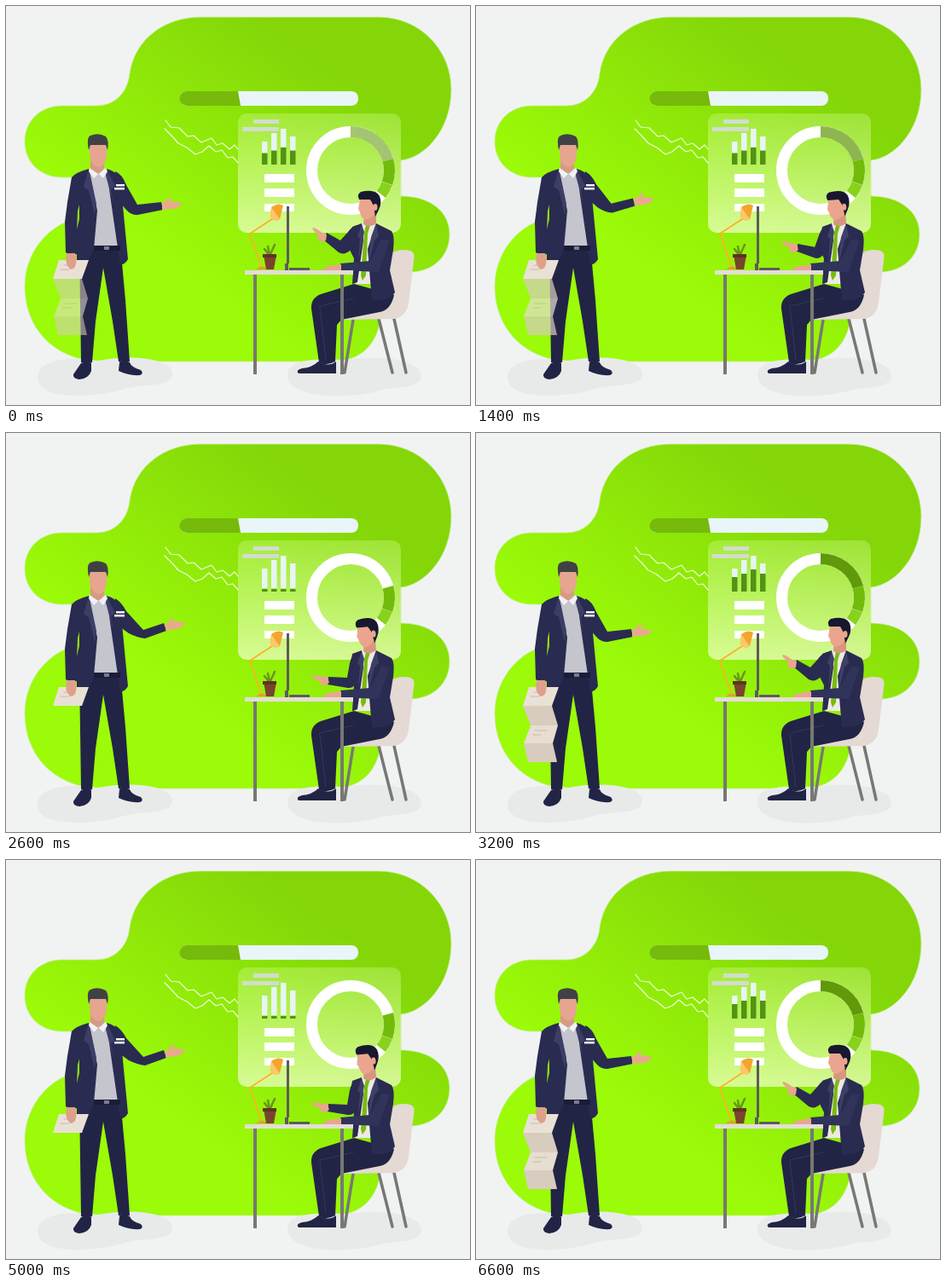
An HTML page for the animation above (6.8 s loop, 544 px wide and 468 px high).

```html
<!DOCTYPE html>
<html lang="en">
<head>
<meta charset="utf-8">
<title>Presentation</title>
<style>
html, body { margin: 0; width: 100%; height: 100%; overflow: hidden; background: #f1f3f3; }
svg { display: block; width: 544px; height: 468px; }
.navy { fill: #2a2b50; }
.dark { fill: #222445; }
.line { fill: none; stroke-linecap: round; stroke-linejoin: round; }
</style>
</head>
<body>
<svg viewBox="0 0 544 468">
  <defs>
    <linearGradient id="lime" gradientUnits="userSpaceOnUse" x1="375" y1="70" x2="205" y2="305">
      <stop stop-color="#84d609"/><stop offset="1" stop-color="#9bfb08"/>
    </linearGradient>
    <linearGradient id="glass" x1="0" y1="0" x2="0" y2="1">
      <stop stop-color="#d8ff9a" stop-opacity=".32"/><stop offset="1" stop-color="#f2ffcc" stop-opacity=".72"/>
    </linearGradient>
  </defs>

  <path fill="url(#lime)" stroke="#c9ee95" stroke-width=".8" d="M66 117H105C130 117 143 99 145 79C151 38 187 13 228 13H437C485 13 522 51 522 98
    C522 147 489 179 463 181V223C496 223 520 240 520 268C520 294 500 312 474 312
    C452 314 441 328 440 360C437 397 416 417 382 417H108C55 414 22 377 22 329C22 284 57 249 94 248
    C122 235 116 201 88 201H66C40 201 22 183 22 159C22 135 40 117 66 117Z"/>
  <g fill="#e8eaea">
    <path d="M37 436C37 414 74 411 108 416C150 408 195 414 195 431C195 448 160 443 139 449C100 461 37 462 37 436Z"/>
    <path d="M330 432C331 412 370 414 400 415C445 408 487 417 487 434C486 450 455 446 438 451C400 462 329 461 330 432Z"/>
  </g>

  <!-- progress bar and trend lines -->
  <rect x="204" y="100" width="209" height="17" rx="8" fill="#e9f5f9"/>
  <path fill="#76ba0b" d="M212 100H272L275 117H212A8.500 8.500 0 0 1 212 100Z"/>
  <g class="line" stroke="#effbdc" stroke-width="1.200">
    <path d="M187 134L193 142 203 143 213 153 220 152 229 160 241 155 247 163 254 161 262 168 268 163 272 168"/>
    <path d="M186 144L195 153 202 161 212 166 222 174 230 171 238 164 246 171 253 169 260 178 266 177 272 184"/>
  </g>

  <!-- dashboard -->
  <rect x="272" y="126" width="191" height="140" rx="10" fill="url(#glass)"/>
  <path fill="#d2dccd" d="M290 133h30v5h-30zM277 142h43v5h-43z"/>
  <path fill="#fff" d="M303 197h35v10h-35zM303 214h35v10h-35zM303 232h35v9h-35z"/>
  <g id="bars"></g>
  <g fill="none" stroke-width="13">
    <circle cx="404" cy="193" r="45.500" stroke="#fff"/>
    <path id="slice" stroke="#60990a"/>
    <path id="slice2" stroke="#72bb0b"/>
    <path id="slice3" stroke="#87d21b"/>
  </g>

  <!-- standing presenter -->
  <path class="dark" d="M86 280H134L140 345 145 417Q139 420 132 417L125 370 114 307 105 370 101 418Q94 421 88 418L87 350Z"/>
  <path class="dark" d="M88 419H100V428Q97 437 86 438Q78 437 79 432ZM133 418H145Q147 424 158 427Q162 431 157 433Q144 434 132 428Z"/>
  <path fill="#c4c5cd" d="M97 192L108 188 118 192 129 211 132 281H102Z"/>
  <path fill="#d79a82" d="M99 178H115V190Q107 202 99 191Z"/>
  <path fill="#e5a58e" d="M98 158H118V176Q117 188 108 189Q99 186 98 175Z"/>
  <path fill="#404145" d="M97 169Q94 154 99 152Q108 148 117 153Q121 158 119 169L117 163H99Z"/>
  <path class="navy" id="arm"/>
  <path id="palm" fill="#eaa98f" d="M0 -4Q5 -5 7 -9Q11 -12 12 -9L9 -5Q16 -6 22 -4Q24 -2 20 0Q15 4 8 3L0 4Z"/>
  <path class="navy" d="M97 191Q82 195 77 201L72 230 69 253 70 289Q77 294 83 291L83 306Q97 304 103 285L107 240Z"/>
  <path class="navy" d="M118 191Q129 194 134 202L138 245 143 297Q139 304 134 303L130 277 122 222Z"/>
  <path fill="#3c3e65" d="M97 191L91 212 97 216 104 245 106 232 99 199ZM118 191L128 211 123 216 126 232 117 199Z"/>
  <path fill="#f1f1f5" d="M98 190L108 197 103 202 97 194ZM117 190L109 197 114 202 119 194ZM129 209h10v2.500h-10zM127 213h12v2.500h-12z"/>
  <path fill="#8fdc10" d="M84 240L86 233 86 250 83 262Z"/>
  <path fill="#1b1c38" d="M103 281h31v6h-31z"/>
  <path fill="#7a7b92" d="M115 282h6v4h-6z"/>

  <!-- folding paper -->
  <g id="folds">
    <path fill="#d8ccbe" d="M55 320H89L96 343H64Z"/>
    <path fill="#e7ddd0" d="M64 343H96L90 364H56Z"/>
    <path fill="#d8ccbe" d="M56 364H90L95 386H61Z"/>
    <path class="line" stroke="#c5bbb0" d="M69 349h14M67 354h9"/>
  </g>
  <path fill="#eae1d6" d="M62 298H97L89 320H55Z"/>
  <path class="line" stroke="#c5bbb0" d="M68 304h8M64 309h10"/>
  <path fill="#dfa089" d="M71 290H81Q84 298 81 306Q76 312 73 306Q69 302 71 290Z"/>

  <!-- chair -->
  <path class="line" stroke="#777873" stroke-width="3.500" d="M407 368L397 430M437 367L453 430M455 367L469 430"/>
  <path fill="#e4d9d3" d="M450 291Q461 284 474 287Q480 288 478 299L472 348Q470 364 455 367L395 368V357L445 352Z"/>

  <!-- seated man -->
  <path class="dark" d="M408 326L455 339Q451 357 438 359L393 368 388 374 386 417Q375 423 367 418L358 355Q357 343 369 338Z"/>
  <path class="line" stroke="#34365c" d="M368 352L407 343M368 353L375 415"/>
  <path class="dark" d="M366 417Q378 424 387 417L387 431H343Q339 427 347 425Q359 424 366 417Z"/>
  <path fill="#eee9e4" d="M416 255H435L433 326H410Z"/>
  <path fill="#78bb10" d="M422 257H427L424 267 422 316 418 322 416 316 420 266Z"/>
  <g id="head">
    <path fill="#d99580" d="M420 244H434V255Q427 261 419 256Z"/>
    <path fill="#eba58e" d="M415 227L433 224 435 239Q432 248 422 251Q416 249 415 242L413 238Z"/>
    <path fill="#17182f" d="M414 227Q411 221 416 218Q433 214 438 223Q441 231 437 239L433 247 431 234 427 227Z"/>
    <ellipse cx="433" cy="236" rx="2.500" ry="4" fill="#eba58e"/>
  </g>
  <path class="navy" id="sleeve"/>
  <path id="finger" fill="#eba58e" d="M8 -1L3 -3Q-5 -9 -8 -9Q-10 -8 -6 -4L-2 0 -2 5Q0 8 4 7L7 6Z"/>
  <path class="navy" d="M417 255L406 259 402 284 408 296 406 326 412 324 419 275Z"/>
  <path class="navy" d="M434 255L452 264Q456 269 454 286L450 310 456 336Q450 347 429 345L427 322 424 285Z"/>
  <path fill="#3d4067" d="M417 256L412 270 415 273 413 300 420 265ZM434 255L437 270 432 275 424 307 428 271Z"/>
  <path fill="#30345b" d="M450 275L440 302 437 312 392 310V302L427 299 440 274Z"/>
  <path fill="#eba58e" d="M393 303L379 305 371 308 375 311 393 310Z"/>

  <!-- desk and objects -->
  <path class="line" stroke="#ffb126" stroke-width="1.800" d="M318 246L286 267 300 308"/>
  <path fill="#f5a52d" d="M311 236Q319 230 325 234L321 250Q315 254 310 247Z"/>
  <path fill="#ffc66b" d="M311 236L321 250Q315 254 310 247Z"/>
  <path fill="#e59a40" d="M293 309Q300 302 307 309Z"/>
  <path class="line" stroke="#67951b" stroke-width="2.500" d="M309 292L307 282M310 291L315 280M307 290L303 285"/>
  <path fill="#79432d" d="M302 292H317L314 309H305Z"/>
  <path fill="#603322" d="M301 291h16v4h-16z"/>
  <path fill="#5b5d58" d="M329 235H332V302H329ZM327 302H331V310H327ZM332 307H356V311H332Z"/>
  <path fill="#777873" d="M290 314H294V432H290ZM392 314H396V432H392Z"/>
  <path fill="#e5ddd5" d="M280 310H407V315H280Z"/>
</svg>
<script>
const el = id => document.getElementById(id);
const mix = (a, b, k) => a + (b - a) * k;
const rect = (x, y, w, h, fill) => `<rect x="${x}" y="${y}" width="${w}" height="${h}" fill="${fill}"/>`;
const ramp = (t, from, to) => Math.max(0, Math.min(1, (t - from) / (to - from)));
const ease = k => k * k * (3 - 2 * k);

// Both paths share the same commands; only their numbers differ.
function blend(from, to, k) {
  const ends = to.match(/[\d.]+/g);
  let i = 0;
  return from.replace(/[\d.]+/g, n => mix(+n, +ends[i++], k).toFixed(2));
}

function arc(from, to) {
  const point = deg => {
    const a = (deg - 90) * Math.PI / 180;
    return `${404 + 45.5 * Math.cos(a)} ${193 + 45.5 * Math.sin(a)}`;
  };
  return `M${point(from)}A45.5 45.5 0 0 1 ${point(to)}`;
}

const place = (id, x, y, turn) => el(id).setAttribute('transform', `translate(${x} ${y}) rotate(${turn})`);
const shape = (id, d) => el(id).setAttribute('d', d);

const columns = [[300, 159, 169], [311, 149, 165], [322, 144, 160], [333, 153, 165]];
const armDown = 'M128 194Q136 197 141 210L154 233 182 230 184 239 154 245Q146 245 141 239L127 223Z';
const armUp = 'M128 194Q136 199 141 209L161 231 185 223 188 232 163 241Q154 240 144 235L126 222Z';
const sleeveUp = 'M412 257Q406 258 401 265L392 275 376 266 372 274 390 289Q397 293 404 286L416 270Z';
const sleeveDown = 'M412 257Q405 260 403 270L400 287 378 286 377 295 401 299Q408 300 411 291L418 272Z';

shape('slice', arc(0, 74.5));
shape('slice2', arc(74.5, 109));
shape('slice3', arc(109.5, 128));

// The scene swaps poses every HALF ms; 1 = open paper and full charts.
const HALF = 1500;
function shown(ms, from, to) {
  const t = (ms + HALF / 2) % (2 * HALF) - HALF / 2;
  return ramp(t, from, to) - ramp(t - HALF, from, to);
}

function draw(ms) {
  const k = 1 - ease(shown(ms, -250, 0));
  const full = ease(shown(ms, -200, 100));
  const fade = shown(ms, -200, 150);

  el('bars').innerHTML = columns.map(([x, top, level]) => {
    const y = mix(183, level, full);
    return rect(x, top, 6.5, y - top - 1 + full, '#e7f5f4') + rect(x, y, 6.5, 186 - y, '#529315');
  }).join('');
  for (const id of ['slice', 'folds']) el(id).setAttribute('opacity', fade);

  shape('arm', blend(armDown, armUp, k));
  place('palm', mix(183, 187, k), mix(235, 228, k), mix(0, -5, k));
  shape('sleeve', blend(sleeveUp, sleeveDown, k));
  place('finger', mix(368, 370, k), mix(269, 290, k), mix(0, -24, k));
  el('head').setAttribute('transform', `rotate(${-6 * k} 427 254)`);
}

function tick() {
  const ms = performance.now() % 6800;
  draw(Math.min(6600, Math.floor(ms / 100) * 100));
  requestAnimationFrame(tick);
}
tick();
</script>
</body>
</html>
```
